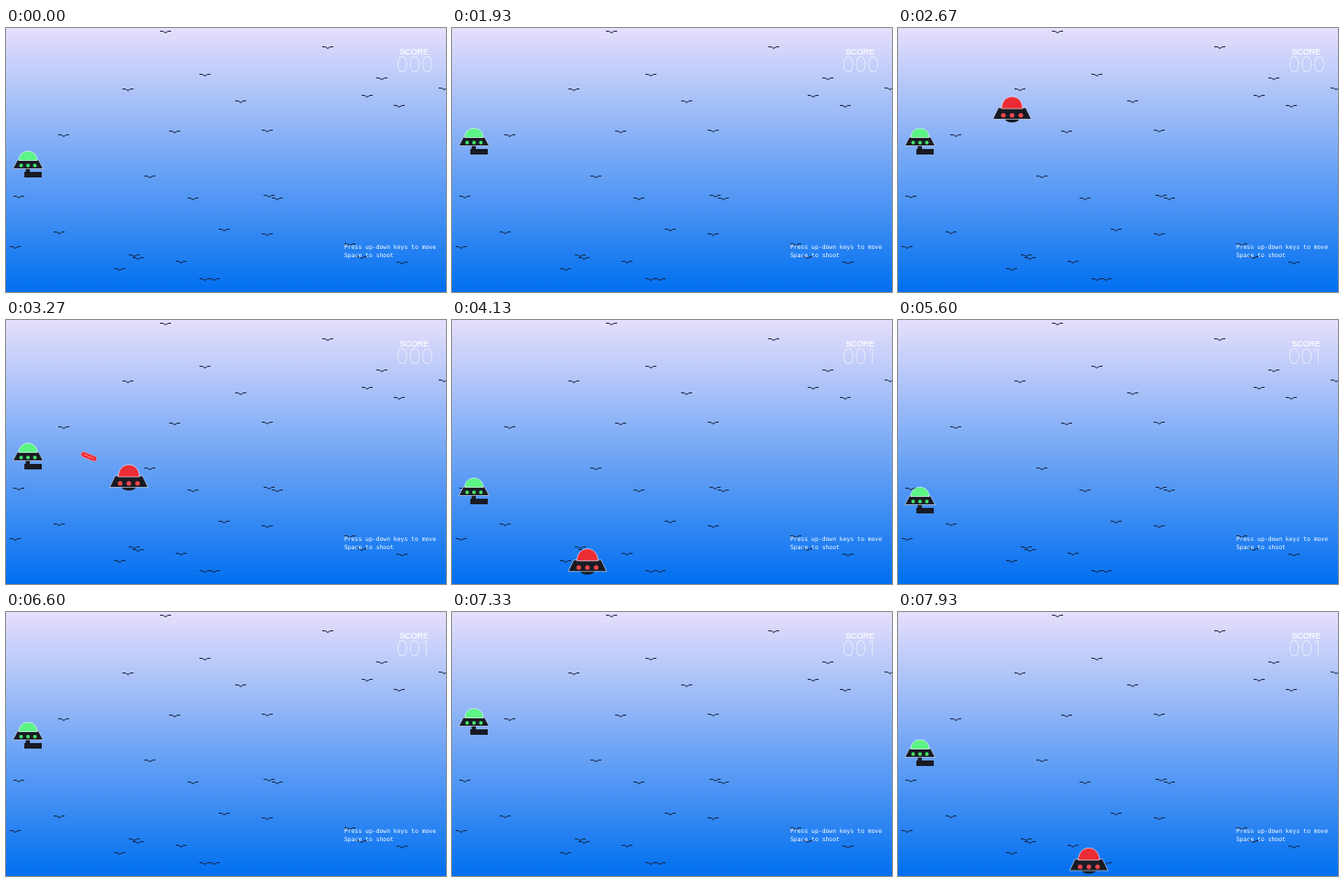
An HTML page that plays this animation: 480 by 288 pixels, repeating every 8000 ms.

```html
<!DOCTYPE html>
<html lang="en">
<head>
<meta charset="utf-8">
<title>Saucer shooter</title>
<style>
  html, body { margin: 0; width: 100%; height: 100%; overflow: hidden; }
  svg { display: block; width: 100vw; height: 100vh; }
  .bird { fill: none; stroke: #14203c; stroke-width: 1; stroke-linejoin: round; }
  .hull { fill: #191b24; stroke: #dfe9ff; stroke-width: .6; }
  .gun { fill: #191b24; }
  .label { font: 8.8px "Liberation Sans", Arial, sans-serif; fill: #fff; stroke: #fff; stroke-width: .2; }
  .digits { font: 100 23px Inter, Lato, sans-serif; fill: #fff; }
  .help { font: 6.4px "DejaVu Sans Mono", monospace; fill: #fff; }
</style>
</head>
<body>
<svg viewBox="0 0 480 288">
  <defs>
    <linearGradient id="sky" x2="0" y2="1">
      <stop stop-color="#e6dffb"/>
      <stop offset="1" stop-color="#006ff0"/>
    </linearGradient>
    <path id="bird" class="bird" d="M-6-.6Q-2-1 0 1.4Q2-1 6-.6"/>
  </defs>
  <rect width="480" height="288" fill="url(#sky)"/>
  <g id="flock"></g>

  <text class="label" x="429.5" y="29">SCORE</text>
  <text class="digits" id="score" x="425.5" y="48">000</text>
  <text class="help" x="369" y="241">Press up-down keys to move</text>
  <text class="help" x="369" y="250.3">Space to shoot</text>

  <g id="shot">
    <rect x="-9" y="-2.8" width="18" height="5.6" rx="2.8" fill="#ee2530" stroke="#f7b3c4" stroke-width=".5"/>
    <path d="M-6 .3L-3-.5L0 .4L3-.5L6 .3" fill="none" stroke="#ff9a98" stroke-width=".8"/>
  </g>

  <g id="enemy">
    <ellipse cy="25" rx="7.5" ry="3.4" fill="#191b24"/>
    <path class="hull" d="M-15 12.5H15L21 25H-21Z"/>
    <path d="M-11.5 13.5C-11.5-4 11.5-4 11.5 13.5Z" fill="#ea2c34" stroke="#f3dfee" stroke-width=".7"/>
    <g fill="#f4474a">
      <circle cx="-9.5" cy="20.8" r="2.5"/><circle cy="20.8" r="2.5"/><circle cx="9.5" cy="20.8" r="2.5"/>
    </g>
  </g>

  <g id="ship">
    <path class="gun" d="M-2.5 19H2V23H15V29H-4V23H-2.5Z"/>
    <path class="hull" d="M-11.5 10H11.5L16.5 19.5H-16.5Z"/>
    <path d="M-10 10.5C-10-3 10-3 10 10.5Z" fill="#5cf484" stroke="#d8f8ee" stroke-width=".7"/>
    <g fill="#43e56c">
      <circle cx="-7.5" cy="16" r="2"/><circle cy="16" r="2"/><circle cx="7.5" cy="16" r="2"/>
    </g>
  </g>
</svg>
<script>
const LOOP = 8, FPS = 15;
const FIRE = 2.98, HIT = 3.52;
const $ = id => document.getElementById(id);

const birds = [
  [174, 4], [351, 21], [217, 51], [133, 67], [256, 80], [410, 55], [394, 74], [429, 85],
  [478, 66], [63, 117], [184, 113], [285, 112], [157, 162], [204, 186], [287, 183], [296, 186],
  [14, 184], [58, 223], [10, 239], [238, 220], [285, 225], [140, 248], [144, 251], [124, 263],
  [191, 255], [217, 274], [227, 274], [375, 236], [388, 250], [432, 256]
];
$('flock').innerHTML = birds.map(([x, y]) => `<use href="#bird" x="${x}" y="${y}"/>`).join('');

// Key presses of the player: [seconds, height of the dome]
const steering = [
  [0, 134], [.9, 134], [1.4, 109], [2.85, 109], [3.267, 134], [3.5, 146], [4.133, 172],
  [4.75, 210], [5.14, 210], [5.6, 182], [6.6, 120], [6.85, 105], [7.35, 105], [7.9, 139], [8, 139]
];

function along(points, t) {
  const i = Math.max(1, points.findIndex(p => p[0] >= t));
  const [t0, a] = points[i - 1], [t1, b] = points[i];
  return a + (b - a) * (t - t0) / (t1 - t0);
}

function place(id, x, y, turn = 0) {
  $(id).setAttribute('transform', `translate(${x.toFixed(2)} ${y.toFixed(2)}) rotate(${turn})`);
}

function draw(seconds) {
  const t = Math.floor((seconds % LOOP) * FPS + .1) / FPS;
  place('ship', 24, along(steering, Math.min(t, LOOP)));

  // The enemy drifts right on a long arc that dips below the stage
  place('enemy', 134 + 15.9 * (t - 3.267), 333.5 - 22.23 * (t - 6.08) ** 2);

  const d = t - 3.267;
  $('shot').style.display = t >= FIRE && t < HIT ? '' : 'none';
  place('shot', 90.5 + 180 * d, 149 + 20 * d, 22);
  $('score').textContent = t < HIT ? '000' : '001';
}

const start = performance.now();
function tick() {
  draw((performance.now() - start) / 1000);
  requestAnimationFrame(tick);
}
tick();
</script>
</body>
</html>
```
